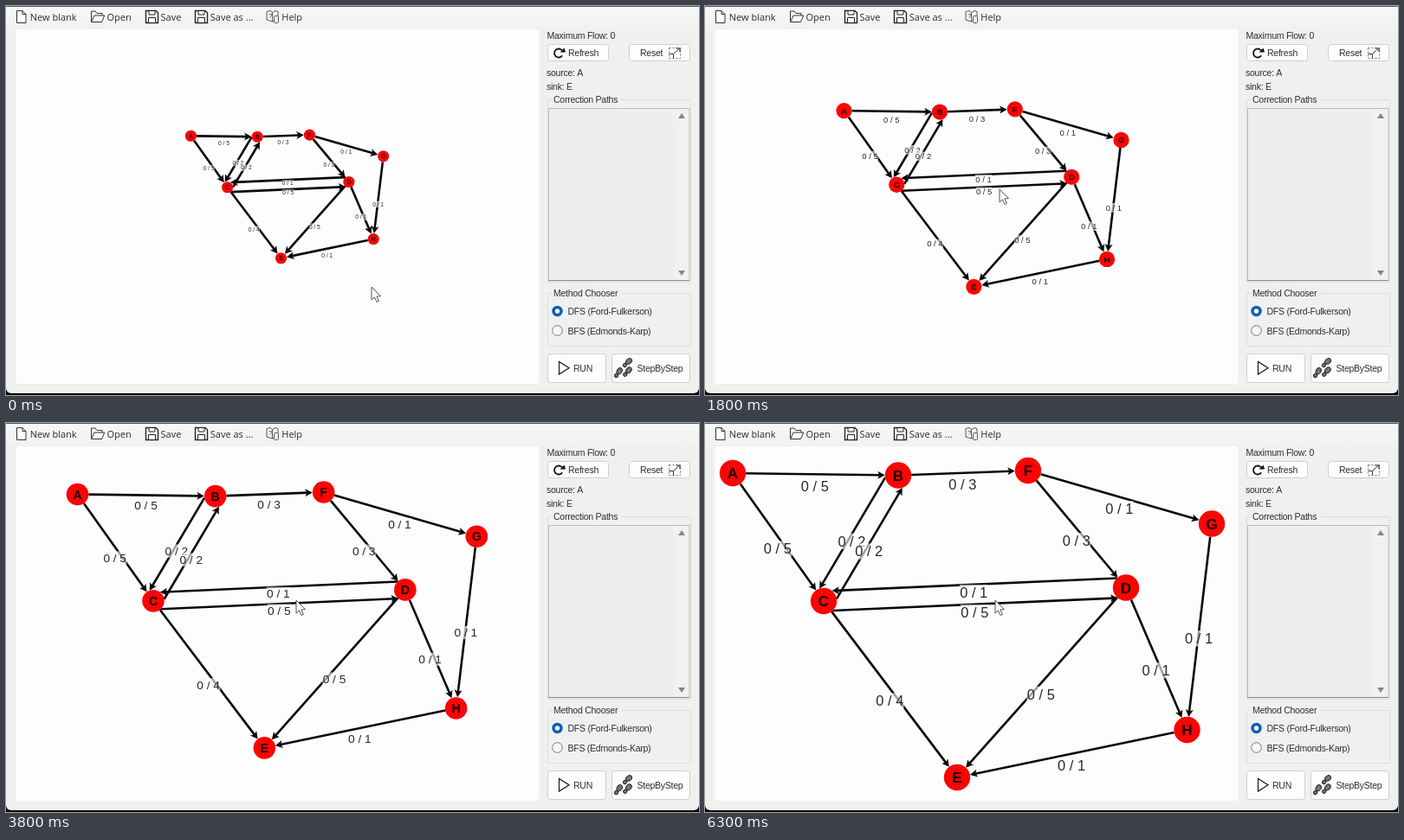
These frames come from a looping animation (800 by 450 pixels, 6.4 s). An HTML page with a canvas:

```html
<!DOCTYPE html>
<html lang="en">
<head>
<meta charset="utf-8">
<title>Maximum flow</title>
<style>
html, body { margin: 0; width: 100%; height: 100%; overflow: hidden; background: #f0f0f0; }
canvas { display: block; }
</style>
</head>
<body>
<canvas id="stage" width="800" height="450"></canvas>
<script>
const c = document.getElementById('stage').getContext('2d');
const LOOP = 6400, STEP = 50, ZOOM = 1.2;
const SANS = '"Liberation Sans", Arial, sans-serif';

// node centres at full zoom
const nodes = {
  A: [32, 58], B: [223, 60.5], C: [137, 206], D: [486, 190.5],
  E: [291, 410], F: [373, 55], G: [585, 116.5], H: [556.5, 355]
};
const edges = ['AB5', 'AC5', 'BC2', 'CB2', 'BF3', 'FG1', 'FD3', 'DC1', 'CD5',
  'CE4', 'DE5', 'DH1', 'GH1', 'HE1'];

// wheel clicks: time and pointer position
const clicks = [[1250, 330, 222], [1700, 338, 210], [2450, 340, 212],
  [3450, 335, 205], [4100, 335, 205]];
// pointer keys: time, x, y
const path = [[0, 422, 325], [450, 422, 325], [650, 407, 323], [1000, 332, 223],
  [1250, 332, 223], [1600, 340, 212], [2500, 340, 212], [2900, 335, 205]];

function view(t) {
  const v = { s: 1, x: 0, y: 0 };
  for (let i = clicks.length - 1; i >= 0 && t < clicks[i][0]; i--) {
    const [, px, py] = clicks[i];
    v.s /= ZOOM;
    v.x = px + (v.x - px) / ZOOM;
    v.y = py + (v.y - py) / ZOOM;
  }
  return v;
}

function pointer(t) {
  let i = path.length - 1;
  while (path[i][0] > t) i--;
  const a = path[i], b = path[i + 1] || a;
  const k = b === a ? 0 : (t - a[0]) / (b[0] - a[0]);
  const e = k * k * (3 - 2 * k);
  return [a[1] + (b[1] - a[1]) * e, a[2] + (b[2] - a[2]) * e];
}

function text(str, x, y, font, color = '#222', gap = 0, align = 'left') {
  c.font = font;
  c.fillStyle = color;
  c.textAlign = align;
  c.letterSpacing = gap + 'px';
  c.fillText(str, x, y);
}

function poly(points, fill, stroke, width = 1, close = true) {
  c.beginPath();
  for (let i = 0; i < points.length; i += 2) c.lineTo(points[i], points[i + 1]);
  if (close) c.closePath();
  if (fill) { c.fillStyle = fill; c.fill(); }
  if (stroke) { c.strokeStyle = stroke; c.lineWidth = width; c.stroke(); }
}

function box(x, y, w, h, r, fill, stroke) {
  c.beginPath();
  c.roundRect(x, y, w, h, r);
  if (fill) { c.fillStyle = fill; c.fill(); }
  if (stroke) { c.strokeStyle = stroke; c.lineWidth = 1; c.stroke(); }
}

function disc(x, y, r, fill, stroke) {
  c.beginPath();
  c.arc(x, y, r, 0, 7);
  if (fill) { c.fillStyle = fill; c.fill(); }
  if (stroke) { c.strokeStyle = stroke; c.lineWidth = 1; c.stroke(); }
}

function floppy(x) {
  poly([x, 5.5, x + 11.5, 5.5, x + 14, 8, x + 14, 19.5, x, 19.5], '#fff', '#222', 1.4);
  box(x + 3.5, 5.5, 7, 4.5, 0, '#fff', '#222');
  box(x + 3, 13.5, 8, 6, 0, '#fff', '#222');
}

function toolbar() {
  const item = (str, x) => text(str, x, 16.5, '11px "Open Sans", "Noto Sans", sans-serif', '#2b2b2b');
  const shade = c.createLinearGradient(0, 0, 0, 26);
  shade.addColorStop(0, '#f8f8f8');
  shade.addColorStop(1, '#f1f1f1');
  c.fillStyle = shade;
  c.fillRect(0, 0, 800, 26);
  c.fillStyle = '#555';
  c.fillRect(0, 0, 800, 1);
  poly([12.5, 5.5, 19, 5.5, 23, 9.5, 23, 19.5, 12.5, 19.5], '#fcfcfc', '#333');
  poly([19, 5.5, 19, 9.5, 23, 9.5], null, '#333', 1, false);
  item('New blank', 27.8);
  poly([98.5, 18.5, 98.5, 6, 103, 6, 105, 8.5, 111, 8.5, 111, 11], '#f8f8f8', '#333', 1, false);
  poly([98.5, 18.5, 102, 11, 113.7, 11, 110.5, 18.5], '#fcfcfc', '#333');
  item('Open', 116.5);
  floppy(161.5);
  item('Save', 178.5);
  floppy(218.5);
  item('Save as ...', 235.8);
  poly([301, 6.5, 305, 5.5, 307.5, 7.5, 311, 5.5, 314, 6.5, 314, 16, 307.5, 18, 301, 16], '#f8f8f8', '#555');
  poly([307.5, 7.5, 307.5, 18], null, '#555', 1, false);
  box(309.5, 11.5, 5, 8, 1, '#f0f0f0', '#555');
  text('?', 303, 14, '8px ' + SANS, '#444');
  item('Help', 318.3);
}

function label(str, x, y) { text(str, x, y, '10.5px ' + SANS, '#2e2e2e', -0.25); }

function button(x, y, w, h) { box(x + .5, y + .5, w - 1, h - 1, 3, '#fdfdfd', '#cfcfcf'); }

function group(title, y, h, w) {
  box(625.5, y + .5, 165, h, 1, null, '#dcdcdc');
  c.fillStyle = '#f0f0f0';
  c.fillRect(630, y - 2, w, 5);
  label(title, 632, y + 3.5);
}

function foot(x, y, a) {
  c.save();
  c.translate(x, y);
  c.rotate(a);
  c.fillStyle = '#777';
  c.strokeStyle = '#222';
  c.lineWidth = 1;
  for (const [dy, w, h] of [[-2.2, 2.8, 3.8], [4.2, 2, 2.2]]) {
    c.beginPath();
    c.ellipse(0, dy, w, h, 0, 0, 7);
    c.fill();
    c.stroke();
  }
  c.restore();
}

function panel() {
  label('Maximum Flow: 0', 624.5, 38);
  button(625, 44, 71, 20);
  c.beginPath();
  c.arc(638, 54.5, 5, .6, 5.6);
  c.strokeStyle = '#111';
  c.lineWidth = 1.8;
  c.stroke();
  poly([639.5, 53.5, 646, 53.5, 644.5, 48.5], '#111');
  label('Refresh', 649, 58);
  button(719, 44, 71, 20);
  label('Reset', 732, 58);
  c.setLineDash([2, 2]);
  box(765.5, 48.5, 13, 12, 0, null, '#777');
  c.setLineDash([]);
  poly([765.5, 55.5, 770.5, 55.5, 770.5, 60.5], null, '#333', 1, false);
  poly([771, 55, 777, 49.5], null, '#333', 1, false);
  poly([773.5, 49, 778, 49, 778, 53], null, '#333', 1.2, false);
  label('source: A', 624, 81);
  label('sink: E', 624, 97);

  group('Correction Paths', 108, 211, 80);
  box(626.5, 118.5, 162.5, 199, 0, '#eeeeee', '#bcbcbc');
  c.fillStyle = '#f1f1f1';
  c.fillRect(771, 119, 17, 198);
  c.fillStyle = '#858585';
  c.fillRect(626, 317, 163, 1);
  poly([776, 130, 784, 130, 780, 124], '#868686');
  poly([776, 306, 784, 306, 780, 312], '#868686');

  group('Method Chooser', 332, 61, 81);
  disc(636.5, 353, 6.2, '#0a5fb4');
  disc(636.5, 353, 2.7, '#fff');
  disc(636.5, 375.5, 5.8, '#f6f6f6', '#777');
  label('DFS (Ford-Fulkerson)', 648.5, 357);
  label('BFS (Edmonds-Karp)', 648.5, 379.5);

  button(625, 402, 68, 34);
  poly([638.5, 411.5, 638.5, 426, 650, 418.7], '#fff', '#222', 1.3);
  label('RUN', 655, 423);
  button(699, 402, 91, 34);
  foot(707, 424, .6);
  foot(717.5, 423, .7);
  foot(717.5, 412.5, .8);
  label('StepByStep', 728.5, 423);
}

function graph(t) {
  const { s, x, y } = view(t);
  const at = n => [x + nodes[n][0] * s, y + nodes[n][1] * s];
  const r = .8 + 14.4 * s;
  const tags = [];
  for (const e of edges) {
    const twin = edges.some(o => o[0] === e[1] && o[1] === e[0]);
    const [ax, ay] = at(e[0]), [bx, by] = at(e[1]);
    const d = Math.hypot(bx - ax, by - ay);
    const ux = (bx - ax) / d, uy = (by - ay) / d;
    const off = twin ? 1.5 + 10 * s : 0;
    const ox = -uy * off, oy = ux * off;
    const cut = Math.sqrt(r * r - off * off);
    const tx = bx + ox - ux * cut, ty = by + oy - uy * cut;
    poly([ax + ox + ux * cut, ay + oy + uy * cut, tx - ux * 5, ty - uy * 5], null, '#080808', 2.6, false);
    const hx = tx - ux * 8.5, hy = ty - uy * 8.5;
    poly([tx, ty, hx - uy * 4.5, hy + ux * 4.5, tx - ux * 6.5, ty - uy * 6.5, hx + uy * 4.5, hy - ux * 4.5], '#080808');
    const drop = twin ? 9.4 * s : 3.5 + 10 * s;
    tags.push(['0 / ' + e[2], (ax + bx) / 2 + ox - s * .7, (ay + by) / 2 + oy + drop]);
  }
  const size = 16.4 * s;
  for (const [str, lx, ly] of tags) {
    c.fillStyle = 'rgba(255,255,255,.62)';
    c.fillRect(lx - size, ly - size * .56, size * 2, size * 1.12);
    text(str, lx, ly + size * .36, size + 'px ' + SANS, '#262626', 0, 'center');
  }
  for (const n in nodes) {
    const [nx, ny] = at(n);
    disc(nx, ny, r, '#fb0404');
    text(n, nx, ny + 6.1 * s, `bold ${17 * s}px ${SANS}`, '#1c0000', 0, 'center');
  }
}

function arrow(t) {
  const [x, y] = pointer(t);
  c.save();
  c.translate(x, y);
  poly([0, 0, 0, 15, 3.4, 11.8, 6, 17.5, 8.4, 16.4, 5.9, 10.9, 10.4, 10.6], '#fff', '#555');
  c.restore();
}

function draw(now) {
  const t = Math.floor(now % LOOP / STEP) * STEP;
  c.fillStyle = '#000';
  c.fillRect(0, 0, 800, 450);
  box(0, -10, 800, 458, 6, '#f0f0f0');
  box(11.5, 27, 604, 410, 3, '#fefdfe');
  toolbar();
  panel();
  c.save();
  c.beginPath();
  c.rect(11, 27, 605, 410);
  c.clip();
  graph(t);
  c.restore();
  arrow(t);
}

const start = performance.now();
function tick() {
  draw(performance.now() - start);
  requestAnimationFrame(tick);
}
tick();
</script>
</body>
</html>
```
